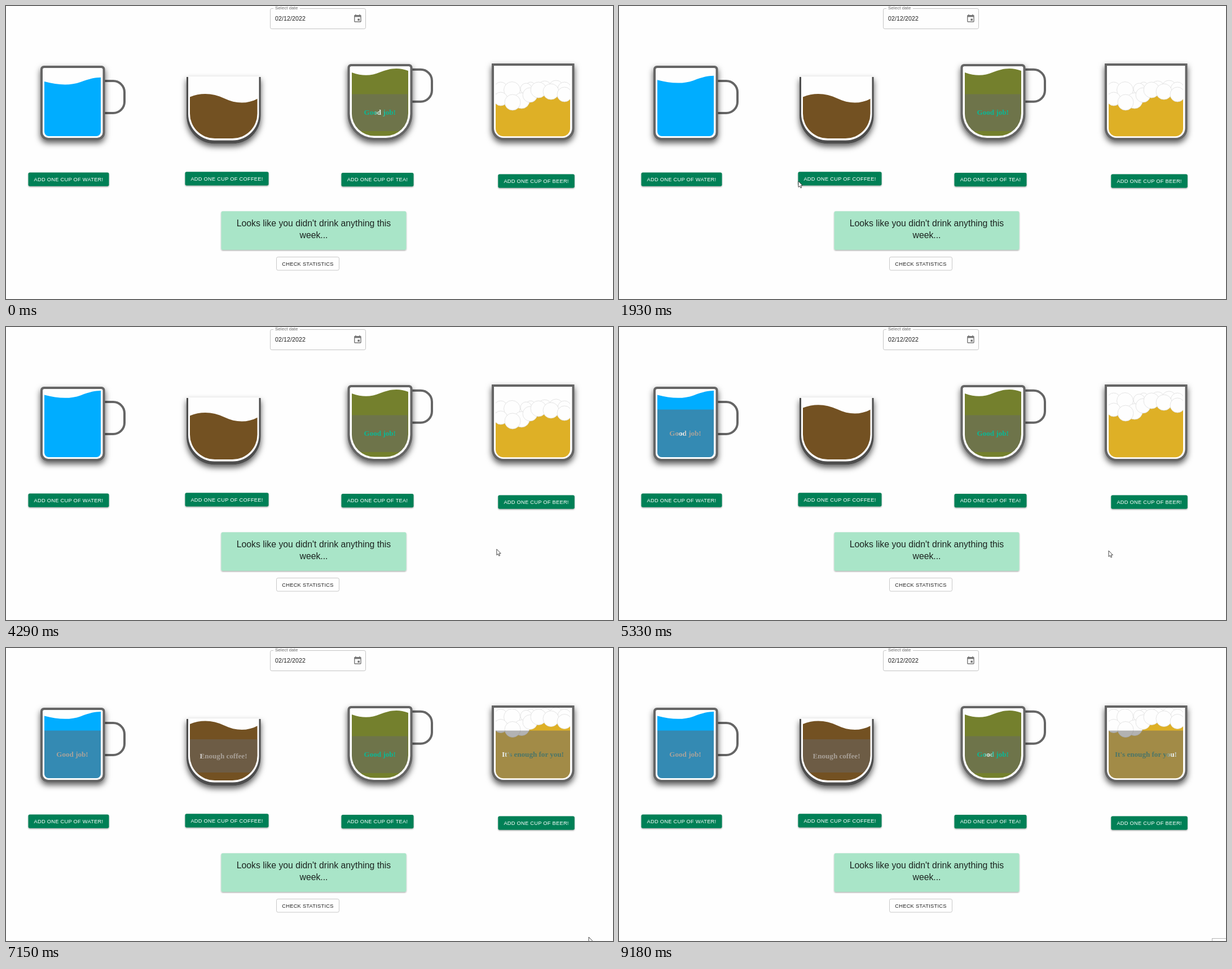
Animation, 1076 px wide and 520 px high, one loop 9.25 s. Source, as an HTML page:

```html
<!DOCTYPE html>
<html lang="en">
<head>
<meta charset="utf-8">
<title>Drink tracker</title>
<style>
html, body { margin: 0; width: 100%; height: 100%; overflow: hidden; background: #fefefe; }
svg { display: block; width: 1076px; height: 520px; font-family: "Liberation Sans", Arial, sans-serif; }
.button { font-size: 9.28px; letter-spacing: .02857em; text-anchor: middle; }
.note { font: bold 13.1px "Liberation Serif", "Times New Roman", serif; text-anchor: middle; }
</style>
</head>
<body>
<svg id="stage" viewBox="0 0 1076 520" xmlns="http://www.w3.org/2000/svg"></svg>
<script>
const LOOP = 9250;
const RISE_TIME = 3100;
const SHINE = { period: 3100, sweep: 1860, travel: 101 };

// Path of a box with one radius for the top corners and one for the bottom
const box = (l, t, r, b, top, bottom) =>
  `M${l} ${t + top}A${top} ${top} 0 0 1 ${l + top} ${t}H${r - top}A${top} ${top} 0 0 1 ${r} ${t + top}` +
  `V${b - bottom}A${bottom} ${bottom} 0 0 1 ${r - bottom} ${b}H${l + bottom}A${bottom} ${bottom} 0 0 1 ${l} ${b - bottom}Z`;

const cups = [
  {
    id: 'water', color: '#00adff', border: '#656565',
    outer: box(61, 106, 175.5, 238, 6, 13), inner: box(65, 110, 171.5, 234, 3, 10),
    liquid: box(68, 110, 168, 231, 0, 8),
    handle: [150, 133, 60, 57],
    wave: 'M68 134C92 140.5 114 141.5 132 135S157 127 168 126.7V270H68Z',
    rise: 13.6, riseAt: 950,
    panel: [68, 146.5, 100, 85], panelAt: 4700, shineAt: 4700,
    note: 'Good job!', noteAt: [117.5, 193], noteColor: '#a8a29a',
    button: [39.5, 295.5, 143, 'ADD ONE CUP OF WATER!'], hover: [1000, 1450]
  },
  {
    id: 'coffee', color: '#735122', border: '#4d4d4d',
    outer: box(320, 126, 451.5, 244.3, 0, 50), inner: box(323, 125, 448.5, 238.5, 0, 47),
    liquid: box(326, 125, 445.5, 235, 0, 44),
    wave: 'M326 161.5C346 153.5 367 154.5 387 164S427 174.5 446 164.5V290H326Z',
    rise: 26.5, riseAt: 3450,
    panel: [326, 162, 119.5, 59], panelAt: 7120, shineAt: 7120,
    note: 'Enough coffee!', noteAt: [385.5, 196], noteColor: '#a8a097',
    button: [317.5, 294.3, 148, 'ADD ONE CUP OF COFFEE!'], hover: [1960, 2450]
  },
  {
    id: 'tea', color: '#74802d', border: '#656565',
    outer: box(605.5, 103, 720.5, 238, 6, 46), inner: box(609.5, 107, 716.5, 234, 3, 43),
    liquid: box(613, 107, 713, 230.5, 0, 40),
    handle: [695, 112.8, 60, 57],
    wave: 'M613 118C634 125.5 648 123.5 663 117.5S694 107.5 713 115V270H613Z',
    rise: 0, riseAt: 0,
    panel: [613, 156.5, 99, 65.5], panelAt: 0, shineAt: -720,
    note: 'Good job!', noteAt: [662.8, 193], noteColor: '#08b896',
    button: [594.5, 296, 128, 'ADD ONE CUP OF TEA!']
  },
  {
    id: 'beer', color: '#deb026', border: '#656565',
    outer: box(861, 102, 1007.5, 238, 0, 20), inner: box(865, 106, 1003.5, 234, 0, 17),
    liquid: box(868, 106, 1000, 231.3, 0, 14),
    wave: 'M868 168C890 172 912 168 932 160S970 155 1000 160V290H868Z',
    foam: [[877, 147, 12], [930, 143, 8], [955, 145, 12], [975, 145, 13], [990, 147, 12], [922, 147, 10],
      [897, 149, 14.5], [877, 165, 12], [914, 168, 14], [898, 171, 14], [929, 158, 13],
      [944, 149, 14], [966, 152, 14], [990, 157, 13]],
    rise: 26.5, riseAt: 3450,
    panel: [868, 146.5, 132, 85], panelAt: 7120, shineAt: 7120,
    note: "It's enough for you!", noteAt: [934, 193], noteColor: '#4a7568',
    button: [872.3, 298.5, 135.5, 'ADD ONE CUP OF BEER!'], hover: [3060, 3880]
  }
];

const cursorPath = [
  [70, 951, 497], [480, 560, 405], [850, 126, 310], [1300, 128, 309], [1650, 215, 308], [1930, 318, 311],
  [2120, 348, 308], [2380, 352, 309], [2620, 560, 333], [2910, 915, 328], [2980, 921, 324],
  [3150, 926, 312], [3800, 926, 313], [3930, 915, 325], [4250, 870, 394], [4700, 868, 397],
  [5950, 868, 397], [6730, 962, 469], [7150, 1033, 513], [7250, 1034, 522]
];

const rect = ([x, y, w, h], attrs) => `<rect x="${x}" y="${y}" width="${w}" height="${h}" ${attrs}/>`;

const cupMarkup = c => `
  <clipPath id="${c.id}-clip"><path d="${c.liquid}"/></clipPath>
  <linearGradient id="${c.id}-shine" gradientUnits="userSpaceOnUse">
    <stop offset="0" stop-color="${c.noteColor}"/><stop offset=".5" stop-color="#fff"/>
    <stop offset="1" stop-color="${c.noteColor}"/>
  </linearGradient>
  ${c.handle ? rect(c.handle, 'rx="20" fill="none" stroke="#656565" stroke-width="4"') : ''}
  <path d="${c.outer}" fill="${c.border}" filter="url(#cup-shadow)"/>
  <path d="${c.inner}" fill="#fefefe"/>
  <g clip-path="url(#${c.id}-clip)">
    <g id="${c.id}-level">
      <path d="${c.wave}" fill="${c.color}"/>
      ${(c.foam || []).map(([x, y, r]) =>
        `<circle cx="${x}" cy="${y}" r="${r}" fill="#fefefe" stroke="#dedede" stroke-width=".8"/>`).join('')}
    </g>
    <g id="${c.id}-panel">
      ${rect(c.panel, 'fill="#696969" fill-opacity=".5"')}
      <text class="note" x="${c.noteAt[0]}" y="${c.noteAt[1]}" fill="url(#${c.id}-shine)">${c.note}</text>
    </g>
  </g>`;

const buttonMarkup = ({ id, button: [x, y, w, label] }) => `
  ${rect([x, y, w, 24.2], `id="${id}-button" rx="2.7" fill="#008057" filter="url(#button-shadow)"`)}
  <text class="button" x="${x + w / 2}" y="${y + 15.2}" fill="#fff">${label}</text>`;

const stage = document.getElementById('stage');
stage.innerHTML = `
  <defs>
    <filter id="cup-shadow" x="-30%" y="-30%" width="160%" height="160%">
      <feDropShadow dx="0" dy="5" stdDeviation="5.5" flood-color="#000" flood-opacity=".65"/>
    </filter>
    <filter id="button-shadow" x="-10%" y="-30%" width="120%" height="180%">
      <feDropShadow dx="0" dy="1.2" stdDeviation="1" flood-color="#000" flood-opacity=".38"/>
    </filter>
  </defs>
  <rect width="1076" height="520" fill="#fefefe"/>
  ${rect([468.5, 4.5, 169, 36], 'rx="2.7" fill="none" stroke="#c4c4c4"')}
  ${rect([474, 3, 47, 3], 'fill="#fefefe"')}
  <text x="477" y="6" font-size="7.95" letter-spacing=".08" fill="#666">Select date</text>
  <text x="477" y="25.7" font-size="10.6" letter-spacing=".1" fill="#212121">02/12/2022</text>
  <path transform="translate(615 14) scale(.7)" fill="#757575" d="M17 12h-5v5h5zM16 1v2H8V1H6v2H5a2 2 0 0 0-2 2v14a2 2 0 0 0 2 2h14a2 2 0 0 0 2-2V5a2 2 0 0 0-2-2h-1V1zM19 19H5V8h14z" fill-rule="evenodd"/>
  ${cups.map(cupMarkup).join('')}
  ${cups.map(buttonMarkup).join('')}
  ${rect([381.5, 364.3, 328, 68.5], 'rx="2.7" fill="#a9e5c8" filter="url(#button-shadow)"')}
  <g font-size="15.8" text-anchor="middle" fill="#1c2420">
    <text x="545.5" y="390.5">Looks like you didn't drink anything this</text>
    <text x="545.5" y="411.5">week...</text>
  </g>
  ${rect([479.5, 445.5, 111, 23.5], 'rx="2.7" fill="#fefefe" stroke="#c8c8c8"')}
  <text class="button" x="535" y="460.7" fill="#212121">CHECK STATISTICS</text>
  ${rect([1051.5, 515.5, 30, 10], 'id="corner" fill="#fefefe" stroke="#b5b5b5"')}
  <path id="cursor" d="M0 0V10.5L2.4 8.4L4 12L5.7 11.3L4.2 7.7H7.4Z" fill="#fff" stroke="#333" stroke-width=".9"/>`;

const el = id => document.getElementById(id);
const clamp = v => Math.min(1, Math.max(0, v));
const show = (id, on) => el(id).setAttribute('visibility', on ? 'visible' : 'hidden');

// Same curve as CSS ease-in-out
function easeInOut(x) {
  let lo = 0, hi = 1, s = .5;
  for (let i = 0; i < 20; i++) {
    s = (lo + hi) / 2;
    const at = 1.26 * s * (1 - s) ** 2 + 1.74 * s * s * (1 - s) + s ** 3;
    if (at < x) lo = s; else hi = s;
  }
  return s * s * (3 - 2 * s);
}

function drawCup(c, t) {
  const level = c.rise * easeInOut(clamp((t - c.riseAt) / RISE_TIME));
  el(c.id + '-level').setAttribute('transform', `translate(0 ${-level})`);
  show(c.id + '-panel', t >= c.panelAt);

  const phase = Math.max(0, t - c.shineAt) % SHINE.period;
  const x = c.panel[0] + SHINE.travel * clamp(phase / SHINE.sweep);
  const shine = el(c.id + '-shine');
  shine.setAttribute('x1', x);
  shine.setAttribute('x2', x + c.panel[2] * .2);

  if (c.hover) {
    const amount = clamp((t - c.hover[0]) / 250) - clamp((t - c.hover[1]) / 250);
    el(c.id + '-button').setAttribute('fill', `rgb(0 ${128 - 38 * amount} ${87 - 26 * amount})`);
  }
}

function drawCursor(t) {
  const next = cursorPath.findIndex(p => p[0] > t);
  show('cursor', next > 0);
  if (next < 1) return;
  const [t0, x0, y0] = cursorPath[next - 1], [t1, x1, y1] = cursorPath[next];
  const k = (t - t0) / (t1 - t0);
  el('cursor').setAttribute('transform', `translate(${x0 + (x1 - x0) * k} ${y0 + (y1 - y0) * k})`);
}

function draw(t) {
  cups.forEach(c => drawCup(c, t));
  drawCursor(t);
  show('corner', t >= 8200);
}

let start;
function tick(now) {
  start ??= now;
  draw((now - start) % LOOP);
  requestAnimationFrame(tick);
}
draw(0);
requestAnimationFrame(tick);
</script>
</body>
</html>
```
